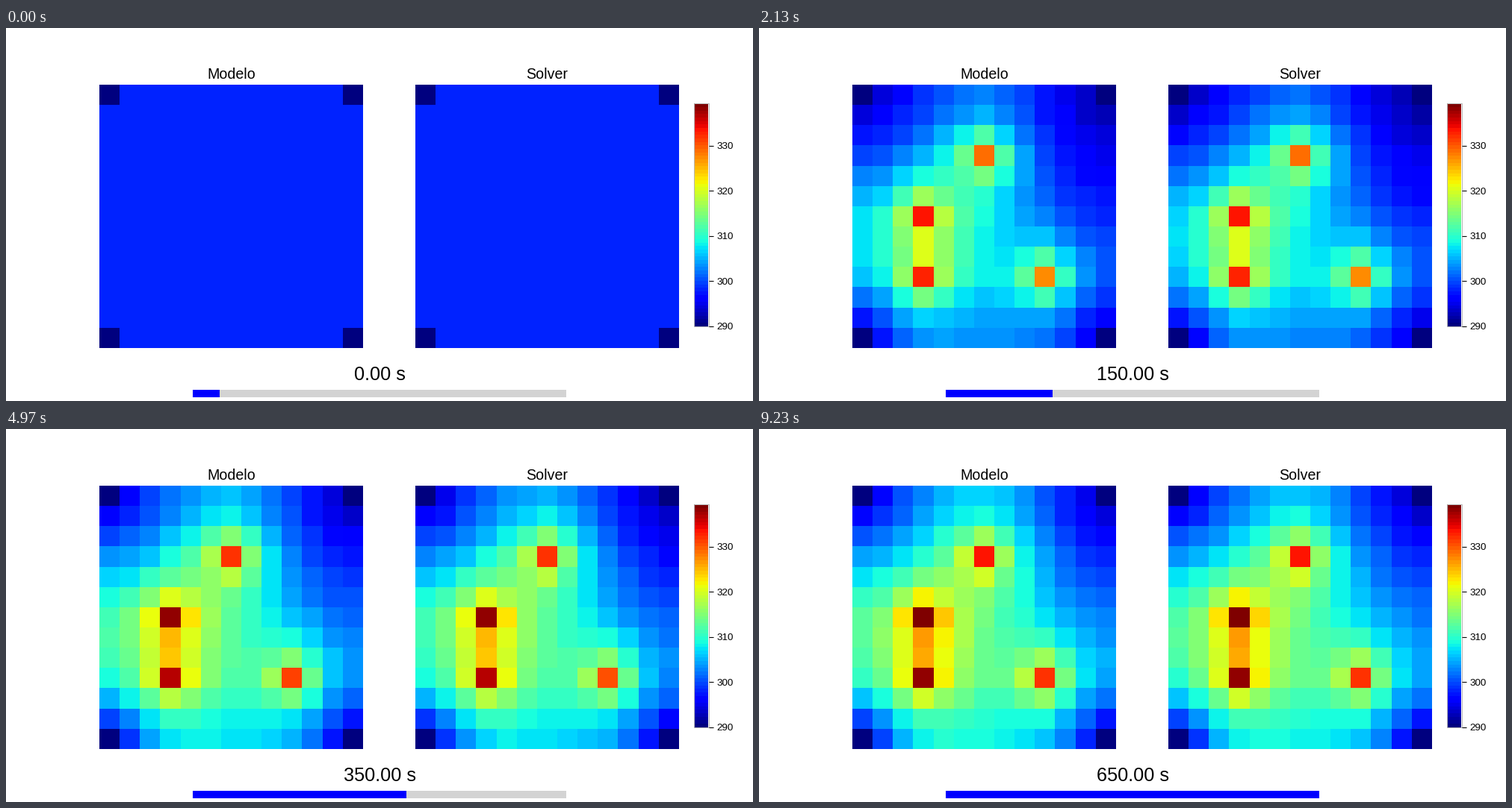
A matplotlib script for the animation above (9.94 s loop, 1000 by 500 pixels).

```python
import numpy as np
import matplotlib.pyplot as plt
from matplotlib.animation import FuncAnimation
from matplotlib.patches import Rectangle

plt.rcParams["font.family"] = "Liberation Sans"

W, H, DPI = 1000, 500, 100
FRAMES, INTERVAL = 14, 710
STEP_TIME = 50.0
N = 13
T_MIN, T_MAX = 290.0, 339.5
CMAP = plt.get_cmap("jet", 64)

# Thin square plate: conduction, radiation on both faces, 1 W heaters
CELL = 0.1 / (N - 1)
THICK = 0.001
G_COND = 15 * THICK
G_RAD = 2 * 0.8 * 5.67e-8 * CELL**2
CAPACITY = 2700 * 900 * THICK * CELL**2
T_START, T_CORNER, T_ENV = 298.0, 290.0, 280.0
HEATERS = [(3, 6), (6, 3), (9, 3), (9, 9)]
CORNERS = np.ix_([0, -1], [0, -1])


def simulate(dt=0.25):
    power = np.zeros((N, N))
    for cell in HEATERS:
        power[cell] = 1.0
    temp = np.full((N, N), T_START)
    temp[CORNERS] = T_CORNER
    fields = [temp.copy()]
    for _ in range(FRAMES - 1):
        for _ in range(int(STEP_TIME / dt)):
            p = np.pad(temp, 1, mode="edge")
            around = p[:-2, 1:-1] + p[2:, 1:-1] + p[1:-1, :-2] + p[1:-1, 2:]
            flow = G_COND * (around - 4 * temp)
            loss = G_RAD * (temp**4 - T_ENV**4)
            temp = temp + dt * (power + flow - loss) / CAPACITY
            temp[CORNERS] = T_CORNER
        fields.append(temp.copy())
    return fields


def approximate(field):
    """Model estimate: runs slightly warm along the border."""
    bias = np.full((N, N), 0.1)
    bias[[0, -1], :] = 0.5
    bias[:, [0, -1]] = 0.4
    bias[:3] += 0.2
    bias[CORNERS] = 0
    return field + bias


solver = simulate()
model = solver[:1] + [approximate(f) for f in solver[1:]]

fig = plt.figure(figsize=(W / DPI, H / DPI), dpi=DPI, facecolor="white")
ax = fig.add_axes([0, 0, 1, 1])


def show(data, left, right, top, bottom):
    return ax.imshow(data, cmap=CMAP, vmin=T_MIN, vmax=T_MAX, aspect="auto",
                     interpolation="nearest", extent=(left, right, bottom, top))


def label(x, y, text, px, **kw):
    return ax.text(x, y, text, fontsize=px * 72 / DPI, color="black", **kw)


def bar(width, color):
    patch = Rectangle((250, 485), width, 10, facecolor=color, lw=0)
    return ax.add_patch(patch)


left_map = show(model[0], 125, 478, 76, 429)
right_map = show(solver[0], 548, 901, 76, 429)
label(301.5, 68, "Modelo", 19.6, ha="center", va="baseline")
label(724, 68, "Solver", 19.6, ha="center", va="baseline")

show(np.linspace(T_MAX, T_MIN, 299)[:, None], 921, 940, 101, 400)
ax.add_patch(Rectangle((920.5, 100.5), 20, 299, fill=False,
                       edgecolor="#b4b4b4", lw=0.72))
for value in range(290, 340, 10):
    y = 399.5 - (value - T_MIN) * 6.04
    ax.plot([941, 946.5], [y, y], color="black", lw=0.8,
            solid_capstyle="butt")
    label(951.5, y + 4.5, str(value), 13.4, va="baseline")

clock = label(500, 472.5, "", 25.3, ha="center", va="baseline")
bar(500, "lightgray")
progress = bar(0, "blue")

ax.set_xlim(0, W)
ax.set_ylim(H, 0)
ax.axis("off")


def update(i):
    left_map.set_data(model[i])
    right_map.set_data(solver[i])
    clock.set_text(f"{i * STEP_TIME:.2f} s")
    progress.set_width(500 * (i + 1) / FRAMES)
    return left_map, right_map, clock, progress


anim = FuncAnimation(fig, update, frames=FRAMES, interval=INTERVAL,
                     repeat=True, repeat_delay=0)
plt.show()
```
